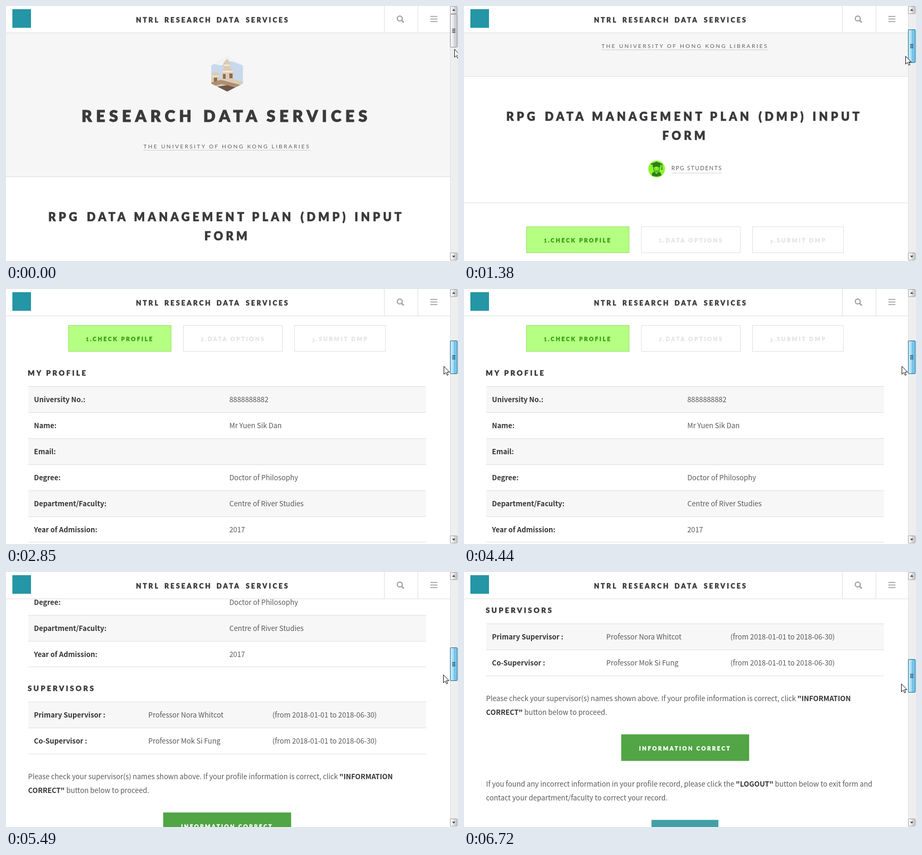
Animation of 850 by 480 pixels, one loop 8070 ms. Source, as an HTML page:

```html
<!DOCTYPE html>
<html lang="en">
<head>
<meta charset="utf-8">
<title>Research Data Services</title>
<style>
  html, body { margin: 0; width: 100%; height: 100%; overflow: hidden; background: #fff; }
  svg { display: block; width: 850px; height: 480px; }
  rect { shape-rendering: crispEdges; }
  .soft { shape-rendering: auto; }
  text { white-space: pre; }
  .cap { font-family: Lato, "Open Sans", sans-serif; font-weight: 900; letter-spacing: .25em; stroke-width: .03em; }
  .thin { font-family: Lato, "Open Sans", sans-serif; font-weight: 400; fill: #5e5e5e; }
  .body { font-family: "Noto Sans CJK SC", "Noto Sans CJK JP", "Noto Sans CJK", "Noto Sans", sans-serif;
          font-size: 13.25px; fill: #5a5a5a; }
  .bold { font-weight: 700; fill: #343436; }
</style>
</head>
<body>
<svg viewBox="0 0 850 480" xmlns="http://www.w3.org/2000/svg">
  <defs>
    <linearGradient id="grey">
      <stop offset="0" stop-color="#f6f6f6"/><stop offset=".48" stop-color="#e9e9eb"/>
      <stop offset=".52" stop-color="#d6d6d9"/><stop offset="1" stop-color="#c9c9cd"/>
    </linearGradient>
    <linearGradient id="blue">
      <stop offset="0" stop-color="#c9ecfa"/><stop offset=".46" stop-color="#a9def6"/>
      <stop offset=".54" stop-color="#6fc3ec"/><stop offset="1" stop-color="#7accf0"/>
    </linearGradient>
    <clipPath id="hex"><path d="M416 95L445.500 112V146L416 161L386 146V112Z"/></clipPath>
  </defs>
  <rect width="850" height="480" fill="#fff"/>
  <g id="page"></g>
  <g id="header"></g>
  <g id="bar">
    <rect x="835" width="15" height="480" fill="#eeeeef"/>
    <rect x="835" width="1" height="480" fill="#e0e0e1"/>
    <rect x="835" y="479" width="15" height="1" fill="#fff"/>
    <g id="thumb">
      <rect class="soft" x="835.500" y=".5" width="13" height="62" rx="1.500" fill="url(#grey)" stroke="#929296"/>
      <rect class="soft" id="glow" x="835.500" y=".5" width="13" height="62" rx="1.500" fill="url(#blue)" stroke="#2d6588"/>
      <path d="M839 28.500H845M839 31.500H845M839 34.500H845" stroke="#33485a" stroke-width="1.400"/>
    </g>
  </g>
  <path id="cursor" d="M.5 .5V15.500L4 12.200L6.500 17.500L8.700 16.500L6.400 11.400H11Z" fill="#fff" stroke="#111"/>
</svg>
<script>
const $ = id => document.getElementById(id);
const LINE = '#dedede', ICON = '#a3a3a5';

const rect = (x, y, w, h, fill, extra = '') =>
  `<rect x="${x}" y="${y}" width="${w}" height="${h}" fill="${fill}" ${extra}/>`;
const text = (x, y, str, cls, style = '') =>
  `<text x="${x}" y="${y}" class="${cls}" style="${style}">${str}</text>`;
const body = (x, y, str, bold) => text(x, y, str, bold ? 'body bold' : 'body');
const cap = (x, y, str, size, fill = '#3a3a3c') =>
  text(x, y, str, 'cap', `font-size:${size}px;fill:${fill};stroke:${fill}`);
const words = (y, size, list) => list.map(([x, word]) => cap(x, y, word, size)).join('');
const strong = str => `<tspan class="bold">${str}</tspan>`;
const dots = (x1, x2, y) =>
  `<path d="M${x1} ${y}H${x2}" stroke="#a8a8a8" stroke-dasharray="1 1"/>`;

function table(top, rows, cols) {
  const at = i => Math.round(top + i * 48.9);
  let out = rect(42, top, 748, 1, LINE);
  rows.forEach((row, i) => {
    if (i % 2 === 0) out += rect(42, at(i) + 1, 748, at(i + 1) - at(i) - 1, '#f7f7f8');
    out += rect(42, at(i + 1), 748, 1, LINE);
    row.forEach((str, c) => out += body(cols[c], at(i) + 30, str, c === 0));
  });
  return out;
}

function step(x, w, label, num, tx, on) {
  const drop = num === 3 ? 2 : 0;
  const digit = `<tspan font-size="8.500" dy="${drop}">${num}</tspan><tspan dy="${-drop}">.${label}</tspan>`;
  return rect(x + .5, 604.5, w - 1, 49, on ? '#b5ff82' : '#fff',
      `class="soft" stroke="${on ? '#9be06c' : '#e0e0e0'}"`) +
    cap(tx, 633.5, digit, 10.5, on ? '#36a012' : '#e4e4e4');
}

const photo = `<g clip-path="url(#hex)">
  <rect x="386" y="95" width="60" height="68" fill="#c8d9ec"/>
  <path d="M386 95H446V112L424 104L404 112L386 108Z" fill="#f0f3f6"/>
  <path d="M386 146V131L390 125H399L402 131V138H406V122L409 117V107L416 99L422 107V117L428 122V138L446 143V163H386Z" fill="#dccbb4"/>
  <path d="M407 122H427V125H407ZM410 110H421V113H410ZM387 131H401V133H387Z" fill="#f1e7d8"/>
  <path d="M408 128H413V137H408ZM420 127H426V136H420ZM391 135H397V143H391Z" fill="#8d6b53"/>
  <path d="M386 144L404 139L446 150V155L405 147L386 152Z" fill="#b08d72"/>
  <path d="M396 152L416 149L440 155L416 163Z" fill="#6e5747"/>
</g>`;

const graduate = `<circle cx="362.200" cy="495.800" r="15.700" fill="#8bf72c"/>
  <g fill="#2f7d1c">
    <path d="M362 482L374 486.500L362 491L350 486.500Z"/>
    <path d="M355 488V493Q362 489 369 493V488L362 491Z"/>
    <path d="M371.500 487H372.700V494L374 497H370.500L371.500 494Z"/>
    <path d="M353 508Q353 502 358 501L362 505L366 501Q371 502 371 508Q362 512 353 508Z"/>
  </g>
  <circle cx="362" cy="496" r="5.500" fill="#8bf72c" stroke="#2f7d1c" stroke-width="1.300"/>
  <path d="M359.500 495V496M364.500 495V496M359.500 498Q362 500 364.500 498" fill="none" stroke="#2f7d1c"/>`;

$('page').innerHTML =
  rect(0, 0, 835, 321, '#f6f6f6') + rect(0, 321, 835, 1, LINE) + photo +
  words(218, 30, [[142, 'RESEARCH'], [371, 'DATA'], [490, 'SERVICES']]) +
  text(258.5, 268, 'THE UNIVERSITY OF HONG KONG LIBRARIES', 'thin', 'font-size:10.4px;letter-spacing:.25em') +
  dots(259, 573, 271.5) +
  words(404.5, 21.6, [[79.5, 'RPG'], [152, 'DATA'], [240.5, 'MANAGEMENT'], [462.5, 'PLAN'], [554, '(DMP)'], [655.5, 'INPUT']]) +
  words(440.5, 21.6, [[373, 'FORM']]) +
  graduate +
  text(390, 498.3, 'RPG STUDENTS', 'thin', 'font-size:10.5px;letter-spacing:.15em') +
  dots(391, 485, 503.5) +
  rect(0, 559, 835, 1, LINE) +
  step(117, 194, 'CHECK PROFILE', 1, 150.5, true) +
  step(333, 187, 'DATA OPTIONS', 2, 366.5) +
  step(542, 172, 'SUBMIT DMP', 3, 575.5) +
  cap(41, 699, 'MY PROFILE', 13.4) +
  table(719, [
    ['University No.:', '8888888882'],
    ['Name:', 'Mr Yuen Sik Dan'],
    ['Email:'],
    ['Degree:', 'Doctor of Philosophy'],
    ['Department/Faculty:', 'Centre of River Studies'],
    ['Year of Admission:', '2017']
  ], [52.5, 420]) +
  cap(41, 1058, 'SUPERVISORS', 13.4) +
  table(1078, [
    ['Primary Supervisor :', 'Professor Nora Whitcot', '(from 2018-01-01 to 2018-06-30)'],
    ['Co-Supervisor :', 'Professor Mok Si Fung', '(from 2018-01-01 to 2018-06-30)']
  ], [52.5, 267.5, 501]) +
  body(41.5, 1224, 'Please check your supervisor(s) names shown above. If your profile information is correct, click ' + strong('"INFORMATION')) +
  body(41.5, 1250, strong('CORRECT"') + ' button below to proceed.') +
  rect(295.6, 1286.6, 240.6, 50, '#51a544', 'class="soft"') +
  cap(329.3, 1317, 'INFORMATION CORRECT', 10.3, '#fff') +
  body(41.5, 1385, 'If you found any incorrect information in your profile record, please click the ' + strong('"LOGOUT"') + ' button below to exit form and') +
  body(41.5, 1411, 'contact your department/faculty to correct your record.') +
  rect(352.6, 1447.6, 125.8, 50, '#40a0a6', 'class="soft"');

$('header').innerHTML =
  rect(0, 0, 835, 50, '#fff') + rect(0, 50, 835, 1, LINE) +
  rect(711, 0, 1, 50, LINE) + rect(774, 0, 1, 50, LINE) +
  rect(12, 6, 35, 35, '#2496a6') +
  words(31, 12.5, [[244.5, 'NTRL'], [298, 'RESEARCH'], [396, 'DATA'], [451, 'SERVICES']]) +
  `<circle cx="740.500" cy="23.500" r="4.700" fill="none" stroke="${ICON}" stroke-width="2.200"/>
   <path d="M744 27L748 31" stroke="${ICON}" stroke-width="2.600"/>` +
  [0, 1, 2].map(i => rect(798, 18.8 + i * 4.8, 13.3, 1.8, ICON, 'class="soft"')).join('');

const button = (y, arrow) =>
  rect(835.5, y + .5, 13, 14, 'url(#grey)', 'class="soft" rx="1.500" stroke="#a4a4a8"') +
  `<path d="${arrow}" fill="#444"/>`;
$('bar').insertAdjacentHTML('beforeend',
  button(0, 'M839 9H845L842 5.500Z') + button(464, 'M839 470H845L842 473.500Z'));

// time, scroll, cursor x, cursor y
const KEYS = [
  [0, 0, 843, 81], [360, 0, 840, 66], [660, 0, 840, 66],
  [1380, 189, 830, 94], [2190, 463, 825, 133], [2850, 536, 823, 145],
  [4440, 536, 823, 145], [5130, 725, 822, 176], [5490, 834, 822, 193],
  [6270, 981, 822, 210], [8070, 981, 822, 210]
];
const LOOP = 8070, TICK = 30;

const rate = (i, c) => (KEYS[i + 1][c] - KEYS[i][c]) / (KEYS[i + 1][0] - KEYS[i][0]);
function slope(i, c) {
  if (i === 0 || i === KEYS.length - 1) return 0;
  const a = rate(i - 1, c), b = rate(i, c);
  return a * b > 0 ? 2 * a * b / (a + b) : 0;
}
// Monotone cubic through the keys
function at(t, c) {
  let i = 0;
  while (i < KEYS.length - 2 && t >= KEYS[i + 1][0]) i++;
  const [p, q] = [KEYS[i], KEYS[i + 1]], d = q[0] - p[0], u = (t - p[0]) / d, v = 1 - u;
  return v * v * (1 + 2 * u) * p[c] + u * u * (3 - 2 * u) * q[c] +
    d * u * v * (v * slope(i, c) - u * slope(i + 1, c));
}

function draw(now) {
  const t = Math.floor(now % LOOP / TICK) * TICK;
  const [scroll, x, y] = [1, 2, 3].map(c => Math.round(at(t, c)));
  $('page').setAttribute('transform', `translate(0 ${-scroll})`);
  $('thumb').setAttribute('transform', `translate(0 ${Math.round(15 + scroll * .1523)})`);
  $('glow').setAttribute('opacity', Math.min(1, t / 360));
  $('cursor').setAttribute('transform', `translate(${x} ${y})`);
}

const start = performance.now();
function loop() {
  draw(performance.now() - start);
  requestAnimationFrame(loop);
}
loop();
</script>
</body>
</html>
```
